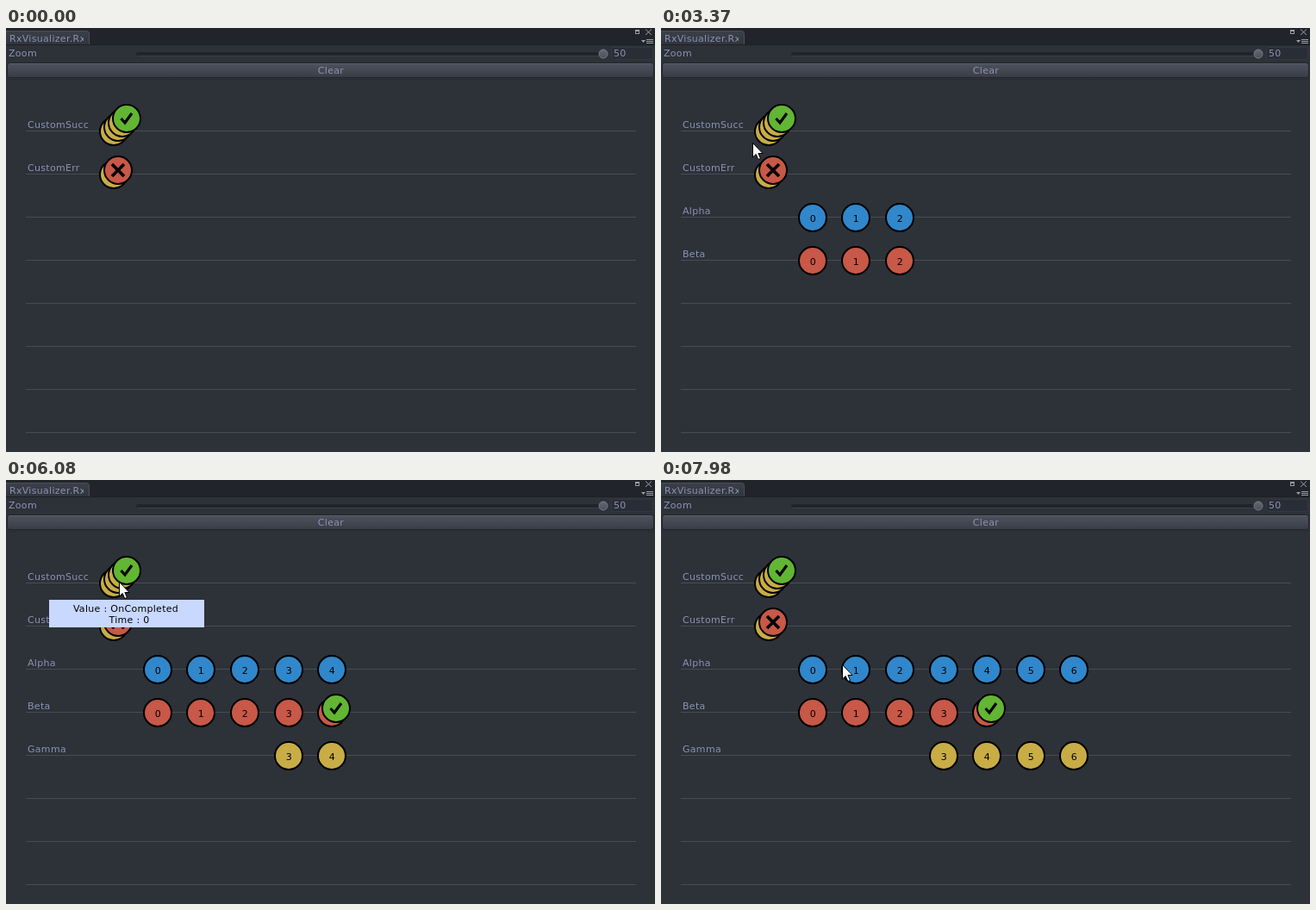
Write an HTML page with a canvas that moves like this. It is 753 by 492 pixels and loops after 8000 ms.

```html
<!DOCTYPE html>
<html>
<head>
<meta charset="utf-8">
<style>
  html, body { margin: 0; width: 100%; height: 100%; overflow: hidden; background: #2d3138; }
  canvas { display: block; }
</style>
</head>
<body>
<canvas id="stage" width="753" height="492"></canvas>
<script>
const ctx = document.getElementById('stage').getContext('2d');
const LOOP = 8000;
const GOLD = '#c8ac46', RED = '#c85847', BLUE = '#3087cb', GREEN = '#62b633';
const TEXT = '#8a94b4';

// Ticks of the shared timer: when each value arrives and where it sits.
const ticks = [1140, 2120, 3120, 4080, 5190, 6130, 7120];
const columns = [176, 226, 277, 328, 378, 429, 479];

// Pointer path: time, x, y of the tip.
const path = [
  [2690, 13, 197], [2860, 59, 165], [3370, 106, 133], [3520, 106, 133],
  [3670, 112, 130], [4080, 112, 130], [4210, 118, 125], [4750, 118, 125],
  [5030, 125, 121], [6040, 125, 121], [6230, 152, 108], [6510, 152, 108],
  [6660, 236, 150], [6790, 246, 156], [7000, 246, 156], [7150, 206, 184],
  [7480, 179, 221], [7790, 179, 221], [7980, 210, 214]
];

// Tooltips: start, end, ball centre, value, time.
const tips = [
  [3600, 4150, 125, 120, 'A', 0],
  [4150, 4860, 130, 115, 'B', 0],
  [4860, 4950, 135, 110, 'C', 0],
  [4950, 6720, 140, 105, 'OnCompleted', 0],
  [7380, 7880, 176, 220, '0', 1]
];

function rect(x, y, w, h, fill) {
  ctx.fillStyle = fill;
  ctx.fillRect(x, y, w, h);
}

function line(points, color, width = 1) {
  ctx.beginPath();
  points.forEach(([x, y]) => ctx.lineTo(x, y));
  ctx.strokeStyle = color;
  ctx.lineWidth = width;
  ctx.stroke();
}

function box(x, y, w, h, radius, fill, border) {
  ctx.beginPath();
  ctx.roundRect(x, y, w, h, radius);
  ctx.fillStyle = fill;
  ctx.fill();
  ctx.strokeStyle = border;
  ctx.lineWidth = 1;
  ctx.stroke();
}

function text(str, x, y, color = TEXT, align = 'left') {
  ctx.font = '11px "DejaVu Sans", sans-serif';
  ctx.letterSpacing = '0.3px';
  ctx.textAlign = align;
  ctx.fillStyle = color;
  ctx.fillText(str, x, y);
}

function gradient(y0, y1, from, to) {
  const g = ctx.createLinearGradient(0, y0, 0, y1);
  g.addColorStop(0, from);
  g.addColorStop(1, to);
  return g;
}

function ball(x, y, color, label = '') {
  ctx.beginPath();
  ctx.arc(x, y, 16, 0, Math.PI * 2);
  ctx.fillStyle = color;
  ctx.fill();
  ctx.strokeStyle = '#000';
  ctx.lineWidth = 2;
  ctx.stroke();
  text(label, x + 0.5, y + 5, '#000', 'center');
}

function completed(x, y) {
  ball(x, y, GREEN);
  line([[x - 6.5, y], [x - 2, y + 5], [x + 6, y - 6]], '#000', 3.2);
}

function failed(x, y) {
  ball(x, y, RED);
  line([[x - 7, y - 7], [x + 7, y + 7]], '#000', 3.8);
  line([[x - 7, y + 7], [x + 7, y - 7]], '#000', 3.8);
}

function drawWindow() {
  rect(0, 0, 753, 492, '#2d3138');
  rect(0, 0, 753, 20, '#21242a');

  box(-3.5, 3.5, 100, 20, 3, gradient(3, 20, '#3c404a', '#30343c'), '#4a4e59');
  rect(0, 20, 753, 472, '#2d3138');
  rect(0, 19, 753, 1, '#1d2025');
  ctx.save();
  ctx.beginPath();
  ctx.rect(0, 0, 90, 20);
  ctx.clip();
  text('RxVisualizer.Rx', 4, 16);
  ctx.restore();

  ctx.strokeStyle = '#9a9ea8';
  ctx.lineWidth = 1;
  ctx.strokeRect(730.5, 2.5, 4, 4);
  rect(730, 2, 5, 2, '#9a9ea8');
  line([[742, 1.5], [749, 8]], '#9a9ea8');
  line([[749, 1.5], [742, 8]], '#9a9ea8');
  for (const y of [13, 15, 17]) rect(743, y, 8, 1, '#9a9ea8');
  ctx.beginPath();
  ctx.moveTo(737, 14);
  ctx.lineTo(742, 14);
  ctx.lineTo(739.5, 17);
  ctx.fillStyle = '#9a9ea8';
  ctx.fill();

  text('Zoom', 3, 33);
  box(151.5, 28.5, 546, 3, 2, '#202329', '#22252b');
  rect(153, 32, 543, 1, '#3b3f48');
  ctx.beginPath();
  ctx.arc(693, 30, 5, 0, Math.PI * 2);
  ctx.fillStyle = gradient(25, 35, '#646873', '#4c505a');
  ctx.fill();
  ctx.strokeStyle = '#747985';
  ctx.lineWidth = 1;
  ctx.stroke();
  box(702.5, 22.5, 48, 14, 2, '#292d36', '#343843');
  text('50', 705, 33);

  box(1.5, 40.5, 750, 17, 3, gradient(41, 58, '#4e525e', '#383c46'), '#22252b');
  rect(4, 41, 745, 1, '#5b5f6b');
  text('Clear', 377, 53, TEXT, 'center');
  rect(0, 59, 753, 1, '#292c33');

  for (let y = 119; y < 492; y += 50) rect(23, y, 708, 1, '#494c53');
}

function drawStreams(t) {
  const count = ticks.filter(tick => t >= tick).length;
  const label = (name, row) => text(name, 25, 116 + row * 50);

  label('CustomSucc', 0);
  for (let i = 0; i < 3; i++) ball(125 + i * 5, 120 - i * 5, GOLD);
  completed(140, 105);
  label('CustomErr', 1);
  ball(125, 170, GOLD);
  failed(130, 165);

  if (count > 0) {
    label('Alpha', 2);
    label('Beta', 3);
  }
  if (count > 3) label('Gamma', 4);
  for (let i = 0; i < count; i++) {
    ball(columns[i], 220, BLUE, i);
    if (i < 5) ball(columns[i], 270, RED, i);
    if (i > 2) ball(columns[i], 320, GOLD, i);
  }
  if (count > 4) completed(383, 265);
}

function drawTip(t) {
  const tip = tips.find(([start, end]) => t >= start && t < end);
  if (!tip) return;
  const [, , x, y, value, time] = tip;
  rect(x - 90, y + 34, 180, 32, '#c8d8ff');
  text('Value : ' + value, x - 1, y + 48, '#000', 'center');
  text('Time : ' + time, x + 3, y + 61, '#000', 'center');
}

function drawPointer(t) {
  if (t < path[0][0]) return;
  const next = path.findIndex(p => p[0] > t);
  const [t1, x1, y1] = next < 0 ? path[path.length - 1] : path[next];
  const [t0, x0, y0] = next < 0 ? [0, x1, y1] : path[next - 1];
  const k = (t - t0) / (t1 - t0);
  const shape = new Path2D('M0 0V16.5L3.7 13L6.3 19L9 17.9L6.4 12H11.5Z');
  ctx.save();
  ctx.translate(Math.round(x0 + (x1 - x0) * k) + 0.5, Math.round(y0 + (y1 - y0) * k) + 0.5);
  ctx.fillStyle = '#fff';
  ctx.fill(shape);
  ctx.strokeStyle = '#000';
  ctx.lineWidth = 1;
  ctx.stroke(shape);
  ctx.restore();
}

function frame() {
  const t = performance.now() % LOOP;
  drawWindow();
  drawStreams(t);
  drawTip(t);
  drawPointer(t);
  requestAnimationFrame(frame);
}
frame();
</script>
</body>
</html>
```
